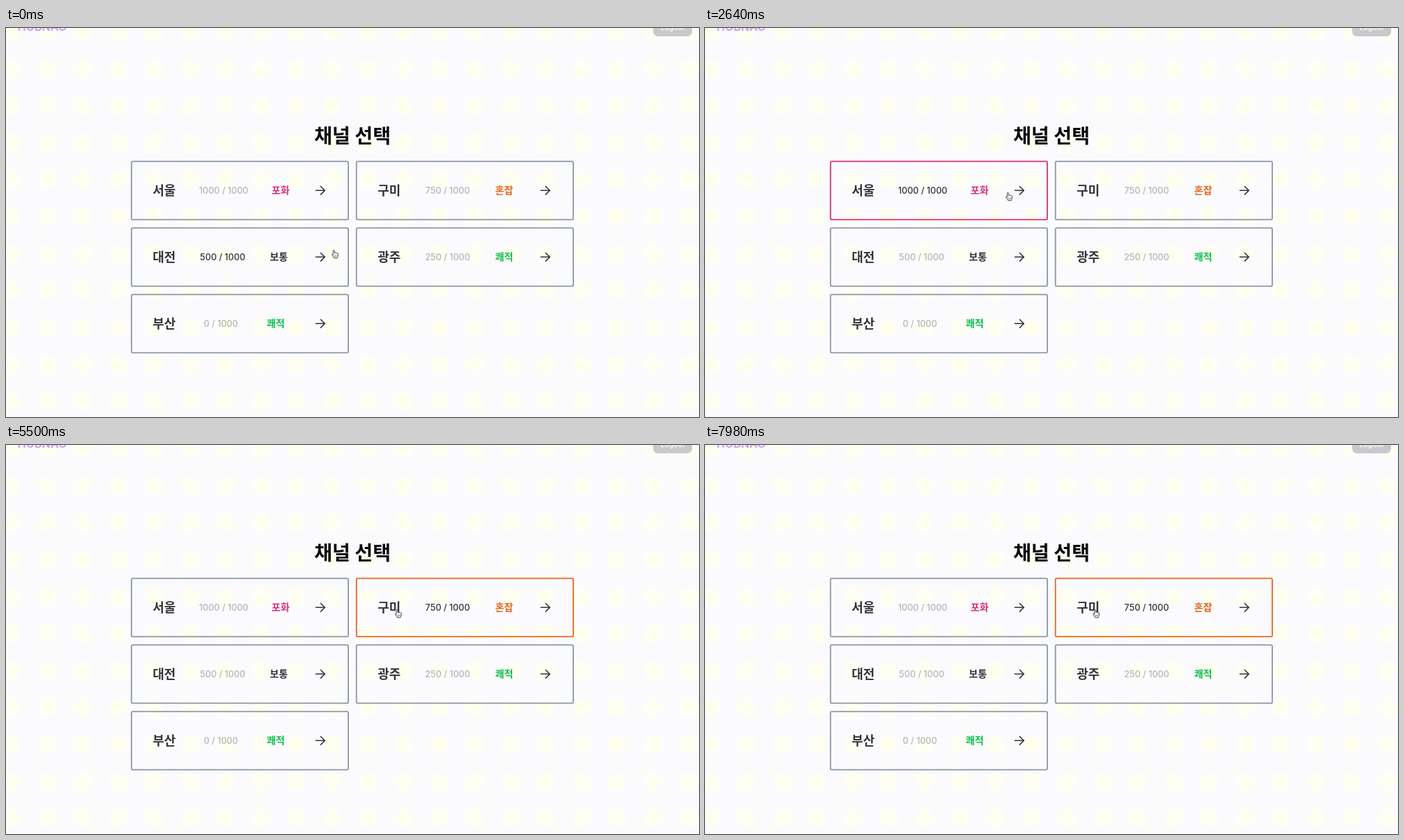
Recreate the animation shown at these times as an HTML page with a canvas. Size 998 px wide and 561 px high, loop 8 s.

```html
<!DOCTYPE html>
<html lang="ko">
<head>
<meta charset="utf-8">
<title>채널 선택</title>
<style>
html, body { margin: 0; width: 100%; height: 100%; overflow: hidden; background: #fbfbfe; }
canvas { display: block; }
</style>
</head>
<body>
<canvas id="stage" width="998" height="561"></canvas>
<script>
const W = 998, H = 561, LOOP = 8000;
const ctx = document.getElementById('stage').getContext('2d');
const LATIN = 'Inter, sans-serif';
const HANGUL = '"Noto Sans CJK KR", "Noto Sans CJK", sans-serif';
const DARK = '#333438', MUTED = '#b5b5b8', BORDER = '#8b95a5';
const PINK = '#d62e78', ORANGE = '#e9641a', GREEN = '#0fbf4e';
const BOX_W = 314, BOX_H = 85;

const channels = [
  { x: 180, y: 192, name: '서울', count: 1000, status: '포화', color: PINK, countX: 313.5, statusX: 395.5 },
  { x: 504, y: 192, name: '구미', count: 750, status: '혼잡', color: ORANGE, countX: 636, statusX: 717.5 },
  { x: 180, y: 288, name: '대전', count: 500, status: '보통', color: DARK, edge: BORDER, countX: 312, statusX: 393 },
  { x: 504, y: 288, name: '광주', count: 250, status: '쾌적', color: GREEN, countX: 636, statusX: 717.5 },
  { x: 180, y: 384, name: '부산', count: 0, status: '쾌적', color: GREEN, countX: 309.5, statusX: 388.5 }
];

// Pointer path: time, x, y
const path = [
  [0, 474, 326], [500, 473, 322], [1200, 464, 270], [1420, 463, 267],
  [1700, 460, 262], [2350, 438, 243], [2640, 438, 243], [3200, 434, 244],
  [4250, 434, 244], [5050, 565, 243], [5500, 565, 243], [5900, 563.5, 243], [LOOP, 563.5, 243]
];

const hand = new Path2D('M-2.8 1.2V-4.6a1 1 0 0 1 2 0V-1.6q1-.7 1.8.1q1-.5 1.6.3q1.4-.3 1.6.9V2q0 1.6-1 2.6V5.8H-1.6V5L-4.4 1.6q-.5-1.2.6-1.2Z');

function pointerAt(t) {
  const i = Math.max(1, path.findIndex(p => p[0] > t));
  const a = path[i - 1], b = path[i];
  const u = (t - a[0]) / (b[0] - a[0]);
  const e = u * u * (3 - 2 * u);
  return { x: a[1] + (b[1] - a[1]) * e, y: a[2] + (b[2] - a[2]) * e };
}

function text(str, x, cy, size, weight, color, family) {
  ctx.font = `${weight} ${size}px ${family}`;
  ctx.fillStyle = color;
  ctx.textAlign = 'center';
  ctx.fillText(str, x, cy + size * 0.37);
}

function makeBackground() {
  const canvas = document.createElement('canvas');
  canvas.width = W;
  canvas.height = H;
  const g = canvas.getContext('2d');
  g.fillStyle = '#fbfbfe';
  g.fillRect(0, 0, W, H);
  for (let y = 5.5; y < H + 20; y += 53.3) {
    for (let x = 8; x < W + 20; x += 51.3) {
      const glow = g.createRadialGradient(x, y, 3, x, y, 17);
      glow.addColorStop(0, 'rgba(255,255,236,.9)');
      glow.addColorStop(0.55, 'rgba(255,255,238,.7)');
      glow.addColorStop(1, 'rgba(255,255,242,0)');
      g.fillStyle = glow;
      g.fillRect(x - 17, y - 17, 34, 34);
    }
  }
  return canvas;
}

function drawHeader() {
  text('HOBNAG', 52, -1.9, 16, 700, '#c8a5ee', LATIN);
  ctx.fillStyle = '#c9c9cc';
  ctx.beginPath();
  ctx.roundRect(932, -20, 56, 32, 7);
  ctx.fill();
  text('Logout', 960, -0.8, 10.3, 600, '#fbfbfe', LATIN);
}

function drawArrow(x, y) {
  ctx.strokeStyle = DARK;
  ctx.lineWidth = 1.6;
  ctx.beginPath();
  ctx.moveTo(x - 6.8, y);
  ctx.lineTo(x + 6.2, y);
  ctx.moveTo(x + 0.3, y - 6.3);
  ctx.lineTo(x + 6.6, y);
  ctx.lineTo(x + 0.3, y + 6.3);
  ctx.stroke();
}

function drawChannel(c, p) {
  const hover = p.x >= c.x && p.x <= c.x + BOX_W && p.y - 5 >= c.y && p.y - 5 <= c.y + BOX_H;
  const cy = c.y + 42.3;
  ctx.strokeStyle = hover ? c.edge || c.color : BORDER;
  ctx.lineWidth = 1.8;
  ctx.beginPath();
  ctx.roundRect(c.x + 0.7, c.y + 0.4, BOX_W - 1.8, BOX_H - 1, 1.8);
  ctx.stroke();
  text(c.name, c.x + 47.7, cy, 18, 700, DARK, HANGUL);
  text(`${c.count} / 1000`, c.countX, cy, 12.7, 500, hover ? DARK : MUTED, LATIN);
  text(c.status, c.statusX, cy - 0.3, 14, 700, c.color, HANGUL);
  drawArrow(c.x + 272.5, cy);
}

function drawPointer(p) {
  ctx.save();
  ctx.translate(p.x, p.y);
  ctx.lineJoin = 'round';
  ctx.fillStyle = '#fff';
  ctx.strokeStyle = '#3c3c40';
  ctx.lineWidth = 1;
  ctx.fill(hand);
  ctx.stroke(hand);
  ctx.lineWidth = 0.6;
  ctx.beginPath();
  for (const x of [-0.9, 0.6, 2.1]) {
    ctx.moveTo(x, 1.6);
    ctx.lineTo(x, 4);
  }
  ctx.stroke();
  ctx.restore();
}

const background = makeBackground();
const start = performance.now();

function frame() {
  const p = pointerAt((performance.now() - start) % LOOP);
  ctx.drawImage(background, 0, 0);
  drawHeader();
  text('채널 선택', 499, 156, 28.2, 700, '#08080a', HANGUL);
  for (const c of channels) drawChannel(c, p);
  drawPointer(p);
  requestAnimationFrame(frame);
}
frame();
</script>
</body>
</html>
```
